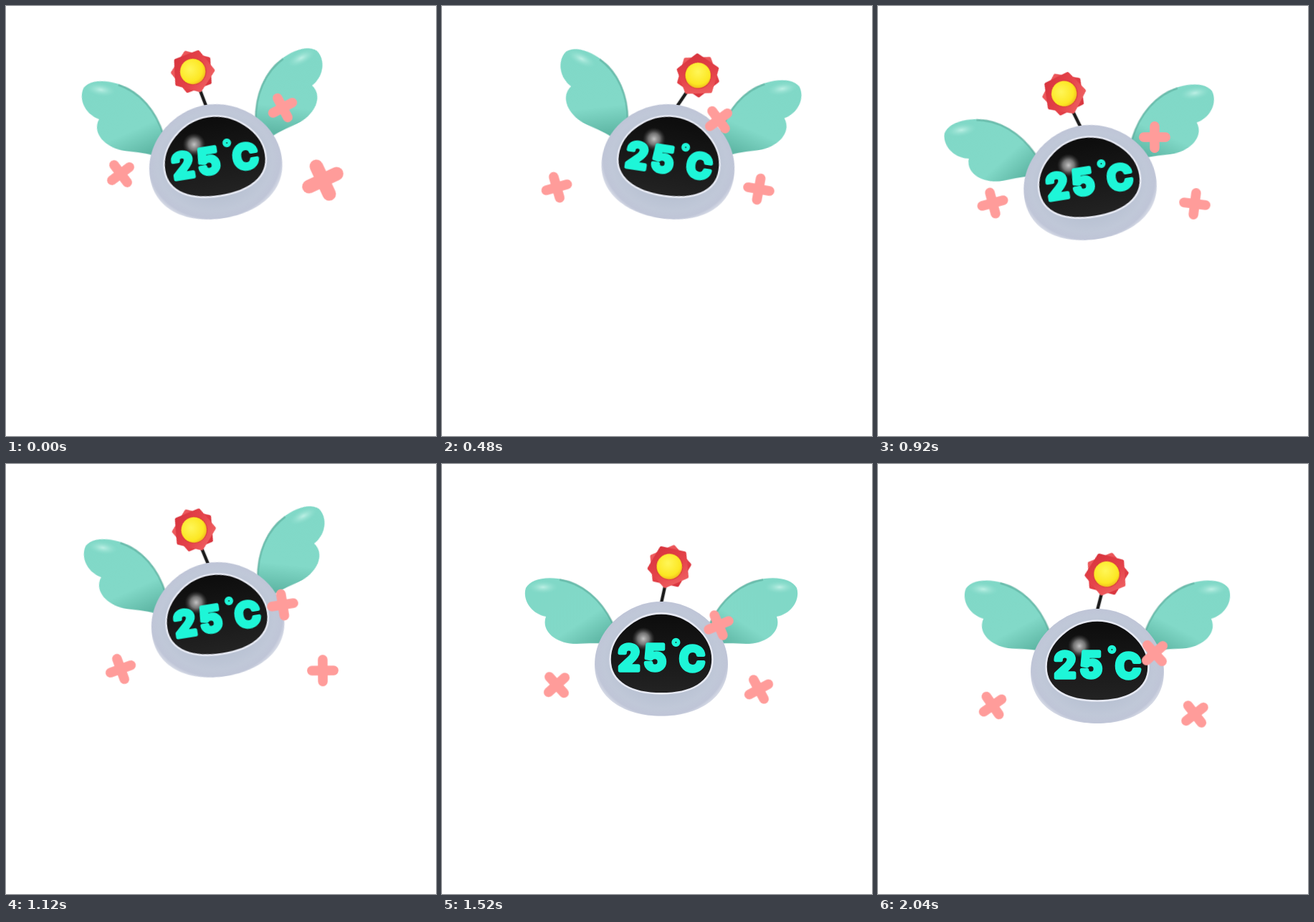
Recreate the animation shown at these times as an HTML page without scripts. Size 600 by 600 pixels, loop 2080 ms.

```html
<!DOCTYPE html>
<html lang="en">
<head>
<meta charset="utf-8">
<title>Flying thermometer</title>
<style>
@property --amp { syntax: "<number>"; inherits: true; initial-value: 1; }
@property --lift { syntax: "<number>"; inherits: true; initial-value: 0; }

html, body { margin: 0; width: 100%; height: 100%; overflow: hidden; background: #fff; }
svg { display: block; width: 100vw; height: 100vh; }

.rig, .sway, .stalk, .cross { animation: 2080ms linear infinite; }
.bob, .wing { animation: 160ms step-end infinite; }

/* Height of the hover, strength of the flapping, rest angle of the wings */
.rig { animation-name: rig; }
@keyframes rig {
  0% { transform: translateY(259px); --amp: 1; --lift: 0; }
  65.3846% { transform: translateY(259px); --amp: 1; --lift: 0; animation-timing-function: steps(3); }
  71.1538% { transform: translateY(272px); --amp: 0; --lift: 0; }
  86.5385% { transform: translateY(271px); --amp: 0; --lift: 0; animation-timing-function: steps(6); }
  98.0769%, 100% { transform: translateY(282px); --amp: 0; --lift: 5; }
}

.bob { animation-name: bob; }
@keyframes bob {
  0%, 100% { transform: translateY(calc(var(--amp) * -42px)); }
  25% { transform: translateY(calc(var(--amp) * 10px)); }
  50% { transform: translateY(calc(var(--amp) * 46px)); }
  75% { transform: translateY(calc(var(--amp) * -13px)); }
}

.wing { animation-name: flap; transform-origin: -78px -38px; }
@keyframes flap {
  0%, 25%, 100% { transform: rotate(calc((var(--amp) * 18 + var(--lift)) * 1deg)); }
  50% { transform: rotate(calc((var(--amp) * -14 + var(--lift)) * 1deg)); }
  75% { transform: rotate(calc(var(--lift) * 1deg)); }
}

.sway { animation-name: sway; }
@keyframes sway {
  0% { transform: translateX(291.5px) rotate(-9deg); }
  1.9231% { transform: translateX(293px) rotate(-9deg); animation-timing-function: steps(5); }
  11.5385% { transform: translateX(316.5px) rotate(8.5deg); }
  32.6923% { transform: translateX(316.5px) rotate(8.5deg); animation-timing-function: steps(5); }
  42.3077% { transform: translateX(295px) rotate(-9deg); }
  63.4615% { transform: translateX(294px) rotate(-9deg); animation-timing-function: steps(4); }
  71.1538%, 100% { transform: translateX(306px) rotate(0deg); }
}

.stalk { animation-name: lean; transform-origin: 0 -78px; }
@keyframes lean {
  0% { transform: rotate(-12deg); }
  1.9231% { transform: rotate(-12deg); animation-timing-function: steps(5); }
  11.5385% { transform: rotate(24deg); }
  32.6923% { transform: rotate(27deg); animation-timing-function: steps(5); }
  42.3077% { transform: rotate(-18deg); }
  63.4615% { transform: rotate(-10deg); animation-timing-function: steps(4); }
  71.1538%, 86.5385% { transform: rotate(12.5deg); }
  98.0769%, 100% { transform: rotate(14.5deg); }
}

.left { animation-name: left; }
@keyframes left {
  0% { transform: translate(160px, 234px) rotate(53deg); animation-timing-function: steps(7); }
  13.4615% { transform: translate(160px, 244px) rotate(20deg); animation-timing-function: steps(10); }
  32.6923% { transform: translate(160px, 262px) rotate(-52deg); animation-timing-function: steps(6); }
  44.2308% { transform: translate(160px, 275px) rotate(-105deg); animation-timing-function: steps(10); }
  63.4615% { transform: translate(160px, 297px) rotate(-115deg); animation-timing-function: steps(12); }
  86.5385% { transform: translate(160px, 324px) rotate(-156deg); animation-timing-function: steps(6); }
  98.0769%, 100% { transform: translate(160px, 337px) rotate(-215deg); }
}

.mid { animation-name: mid; }
@keyframes mid {
  0% { transform: translate(386px, 142px) rotate(62deg); animation-timing-function: steps(7); }
  13.4615% { transform: translate(386px, 149.5px) rotate(57deg); animation-timing-function: steps(10); }
  32.6923% { transform: translate(386px, 168px) rotate(50deg); animation-timing-function: steps(6); }
  44.2308% { transform: translate(386px, 183px) rotate(0deg); animation-timing-function: steps(10); }
  63.4615% { transform: translate(386px, 210px) rotate(-18deg); animation-timing-function: steps(12); }
  86.5385% { transform: translate(386px, 246px) rotate(-30deg); animation-timing-function: steps(6); }
  98.0769%, 100% { transform: translate(386px, 264px) rotate(-42deg); }
}

.right { animation-name: right; }
@keyframes right {
  0% { transform: translate(442px, 243px) rotate(-25deg) scale(1.4); animation-timing-function: steps(7); }
  13.4615% { transform: translate(442px, 247.5px) rotate(-45deg) scale(1); animation-timing-function: steps(10); }
  32.6923% { transform: translate(442px, 263.5px) rotate(-115deg) scale(1); animation-timing-function: steps(6); }
  44.2308% { transform: translate(442px, 276px) rotate(-173deg) scale(1); animation-timing-function: steps(10); }
  63.4615% { transform: translate(442px, 300.5px) rotate(-188deg) scale(1); animation-timing-function: steps(12); }
  86.5385% { transform: translate(442px, 334px) rotate(-237deg) scale(1); animation-timing-function: steps(6); }
  98.0769%, 100% { transform: translate(442px, 349px) rotate(-308deg) scale(1); }
}

.cross { fill: none; stroke: #ff9c9a; stroke-width: 13.5; stroke-linecap: round; }
.read {
  font: 700 49px Inter, "Open Sans", sans-serif;
  text-anchor: middle; fill: #1ef6d8;
  stroke: #1ef6d8; stroke-width: 5.5; stroke-linejoin: round;
}
.read .deg { font-size: 28px; stroke-width: 2.4; }
.read .unit { font-size: 48px; }
</style>
</head>
<body>
<svg viewBox="0 0 600 600">
  <defs>
    <radialGradient id="shell" cx=".5" cy=".5" r=".53">
      <stop offset=".6" stop-color="#b9c2d3"/>
      <stop offset=".82" stop-color="#c0c8d8"/>
      <stop offset=".93" stop-color="#bfc5d7"/>
      <stop offset="1" stop-color="#dce0ea"/>
    </radialGradient>
    <linearGradient id="glass" x2="0" y2="1">
      <stop offset="0" stop-color="#0c0c0c"/>
      <stop offset="1" stop-color="#232323"/>
    </linearGradient>
    <radialGradient id="shine">
      <stop offset="0" stop-color="#c4c4c4"/>
      <stop offset=".5" stop-color="#8c8c8c" stop-opacity=".8"/>
      <stop offset="1" stop-color="#444" stop-opacity="0"/>
    </radialGradient>
    <linearGradient id="mint" x1=".1" y1="0" x2=".9" y2=".9">
      <stop offset="0" stop-color="#80d8c7"/>
      <stop offset=".7" stop-color="#82d9c8"/>
      <stop offset="1" stop-color="#5fb7a5"/>
    </linearGradient>
    <radialGradient id="gleam">
      <stop offset="0" stop-color="#bdf0e5"/>
      <stop offset="1" stop-color="#90dfcf" stop-opacity="0"/>
    </radialGradient>
    <linearGradient id="petal" x2="1" y2="1">
      <stop offset="0" stop-color="#f26a6a"/>
      <stop offset=".5" stop-color="#e5434a"/>
      <stop offset="1" stop-color="#d6323c"/>
    </linearGradient>
    <radialGradient id="core" cx=".42" cy=".38" r=".62">
      <stop offset="0" stop-color="#fff658"/>
      <stop offset=".8" stop-color="#fce722"/>
      <stop offset="1" stop-color="#f2c41e"/>
    </radialGradient>
    <g id="feather">
      <path fill="url(#mint)" d="M-64-42C-81-83-110-107-144-112C-165-115-183-110-189-99C-194-84-183-63-161-59C-168-40-149-21-118-21C-105-21-90-23-74-20Z"/>
      <path d="M-68-50C-84-83-111-106-142-110.500" fill="none" stroke="#4f9c8c" stroke-width="3" opacity=".45"/>
      <ellipse cx="-165" cy="-100" rx="21" ry="9" fill="url(#gleam)"/>
    </g>
    <path id="penta" d="M0-28.500L27.100-8.800L16.750 23.050H-16.750L-27.100-8.800Z"/>
    <path id="plus" d="M-15.2 0H15.2M0-15.2V15.2"/>
  </defs>

  <g class="rig"><g class="bob"><g class="sway">
    <g class="wing"><use href="#feather"/></g>
    <g transform="scale(-1 1)"><g class="wing"><use href="#feather"/></g></g>

    <g class="stalk">
      <path d="M0-74V-108" stroke="#1c1c1c" stroke-width="4.5"/>
      <g transform="translate(0 -130)">
        <g fill="url(#petal)" stroke="url(#petal)" stroke-width="4.5" stroke-linejoin="round">
          <use href="#penta"/>
          <use href="#penta" transform="rotate(180)"/>
        </g>
        <circle r="18.8" fill="#d8343b"/>
        <circle r="17.8" fill="url(#core)"/>
      </g>
    </g>

    <path fill="url(#shell)" d="M0-80C46-80 93-42 93 8C93 56 50 80 0 80C-50 80-93 56-93 8C-93-42-46-80 0-80Z"/>
    <path fill="url(#glass)" stroke="#e6e9f3" stroke-width="2.6" d="M0-63.500C36-63.500 71.500-33 71.500 1C71.500 34 40 48.500 0 48.500C-40 48.500-71.500 34-71.500 1C-71.500-33-36-63.500 0-63.500Z"/>
    <circle cx="-25" cy="-28" r="16" fill="url(#shine)"/>
    <text class="read" x="-45 -8.5" y="16">25<tspan class="deg" x="20.5" y="-7">°</tspan><tspan class="unit" x="43" y="17">C</tspan></text>
  </g></g></g>

  <use class="cross left" href="#plus"/>
  <use class="cross mid" href="#plus"/>
  <use class="cross right" href="#plus"/>
</svg>
</body>
</html>
```
